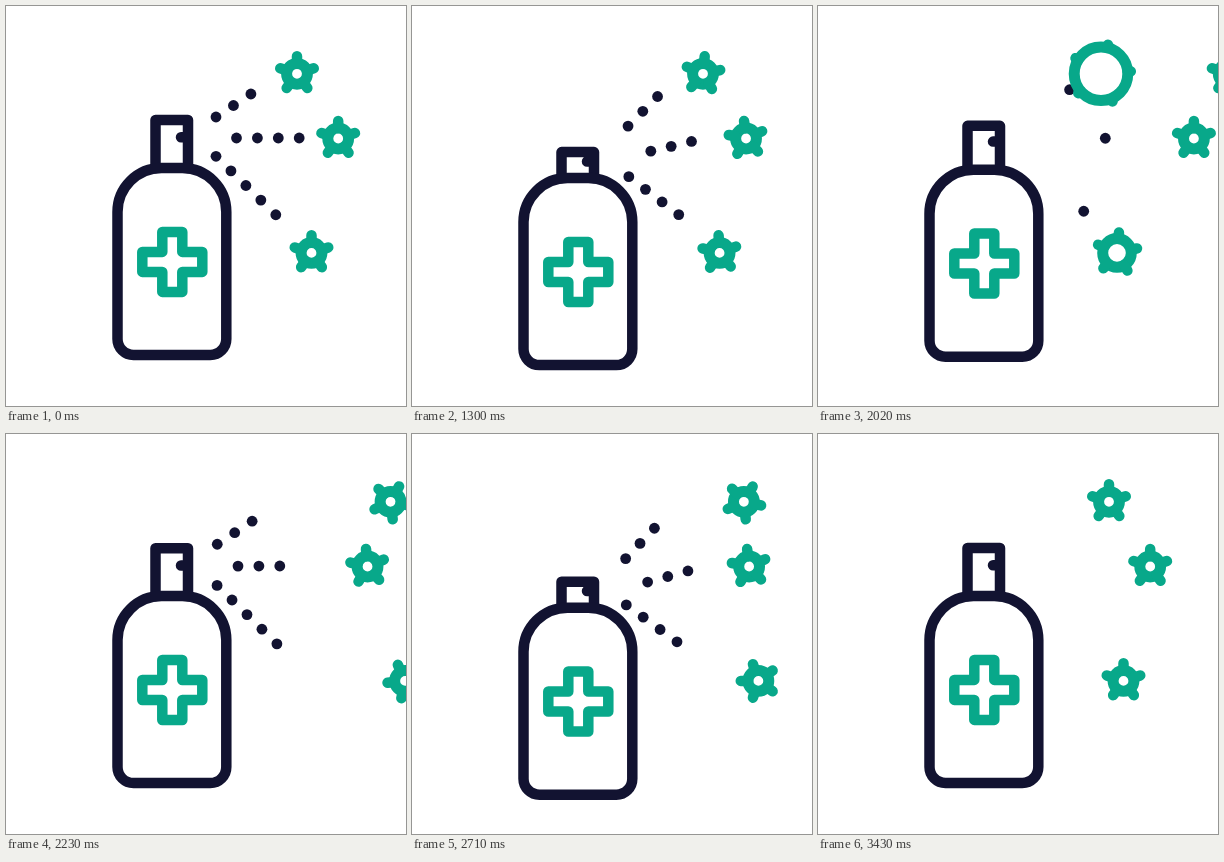
An HTML page for the animation above (3460 ms loop, 400 by 400 pixels).

```html
<!DOCTYPE html>
<html lang="en">
<head>
<meta charset="utf-8">
<title>Disinfectant spray</title>
<style>
  html, body { margin: 0; width: 100%; height: 100%; overflow: hidden; background: #fff; }
  svg { display: block; width: 100vw; height: 100vh; }
</style>
</head>
<body>
<svg viewBox="0 0 400 400" fill="none" stroke="#121331" stroke-width="10.5" stroke-linecap="round" stroke-linejoin="round">
  <g id="spray" fill="#121331" stroke="none"></g>
  <path id="nozzle"/>
  <g id="bottle">
    <path d="M111.5 206a44 44 0 0 1 44-44H176.3a44 44 0 0 1 44 44V333a16 16 0 0 1-16 16H127.5a16 16 0 0 1-16-16Z"/>
    <path stroke="#08a88a" d="M156.3 225.9h20v20h20v20h-20v20h-20v-20h-20v-20h20Z"/>
  </g>
  <g id="germs" stroke="#08a88a"></g>
</svg>
<script>
const HOLD = 1030, STEP = 30, LOOP = 3460, CYCLE = 40.5, GAP = 20.9;
const $ = id => document.getElementById(id);
const clamp = x => Math.max(0, Math.min(1, x));
// smooth 0 to 1 between a and b
const ease = (n, a, b) => (1 - Math.cos(Math.PI * clamp((n - a) / (b - a)))) / 2;

// keys: [time, value] pairs joined by smooth moves
function track(n, keys) {
  let v = keys[0][1];
  for (let i = 1; i < keys.length; i++) {
    v += (keys[i][1] - keys[i - 1][1]) * ease(n, keys[i - 1][0], keys[i][0]);
  }
  return v;
}

const rays = [
  { x: 210, y: 111, ex: 254, ey: 82 },
  { x: 230.5, y: 132, ex: 294, ey: 132 },
  { x: 210, y: 150.3, ex: 280, ey: 218.7 }
];

// pop: when the old germ starts to burst; end, k, pow: slowing entry of the new one
const germs = [
  { x: 291, y: 67.8, pop: 26, end: 75.9, k: 0.773, pow: 1.35,
    dx: [[0, 0], [21, 0], [34, -8]], turn: [[0, 0], [21, 12], [34, 13.5]],
    roll: [[34, 144], [48, 58], [66, 2], [78, 0]] },
  { x: 332.2, y: 132.5, pop: 14.8, end: 64, k: 0.266, pow: 1.5,
    dx: [[0, 0], [21, 4]], turn: [[0, 0], [21, -14]],
    roll: [[21, 72], [34, 0], [48, -10], [66, -3], [78, 0]] },
  { x: 305.5, y: 246.9, pop: 30.1, end: 75.9, k: 0.773, pow: 1.35,
    dx: [[0, 0], [21, 4.5], [34, -6.5]], turn: [[0, 0], [21, -7], [34, 5.5]],
    roll: [[34, 150], [48, 90], [66, 18], [80, 0]] }
];

function germ(x, y, r, turn) {
  const tip = 17.3 + (r - 10) * 0.75;
  let d = "";
  for (let i = 0; i < 5; i++) {
    const a = (turn - 90 + 72 * i) * Math.PI / 180, c = Math.cos(a), s = Math.sin(a);
    const q = Math.min(r, tip);
    d += `M${x + q * c} ${y + q * s}L${x + tip * c} ${y + tip * s}`;
  }
  return `<circle cx="${x}" cy="${y}" r="${r}" stroke-width="11"/><path d="${d}"/>`;
}

function drawGerms(n) {
  let out = "";
  for (const g of germs) {
    const p = clamp((n - g.pop) / 10);
    if (p < 1) out += germ(g.x + track(n, g.dx), g.y, 10.4 + 25.6 * p * p, track(n, g.turn));
    const x = g.x + g.k * Math.pow(Math.max(0, g.end - n), g.pow);
    if (x < 430 && n > 0 && (p >= 1 || x > g.x + 30)) out += germ(x, g.y, 10.4, track(n, g.roll));
  }
  $("germs").innerHTML = out;
}

function drawSpray(c, drop) {
  const cut = ease(c, 25.5, CYCLE);
  const phase = (3 * c - 0.00053 * c ** 3) % GAP;
  let out = "";
  for (const r of rays) {
    const y = r.y + 1.5 * drop, w = r.ex - r.x, h = r.ey - y, len = Math.hypot(w, h);
    if (cut >= 1) break;
    for (let d = cut * len + phase; d <= len + 0.5; d += GAP) {
      out += `<circle cx="${r.x + w * d / len}" cy="${y + h * d / len}" r="5.4"/>`;
    }
  }
  $("spray").innerHTML = out;
}

function draw(ms) {
  const t = ms % LOOP;
  const n = t < HOLD ? 0 : Math.floor((t - HOLD) / STEP) + 1;
  const c = n > CYCLE ? n - CYCLE : n;
  const drop = 12 * (ease(c, 0, 13.5) - ease(c, 13.5, CYCLE));
  const high = 48 - 22 * (ease(c, 0, 8) - ease(c, 18, CYCLE));
  const base = 162 + drop, top = base - high, hole = base - 0.64 * high;
  $("bottle").setAttribute("transform", `translate(0 ${drop})`);
  $("nozzle").setAttribute("d", `M149.5 ${base}V${top}H182V${base}M175 ${hole}H182`);
  drawSpray(c, drop);
  drawGerms(n);
}

const start = performance.now();
function tick() {
  draw(performance.now() - start);
  requestAnimationFrame(tick);
}
tick();
</script>
</body>
</html>
```
